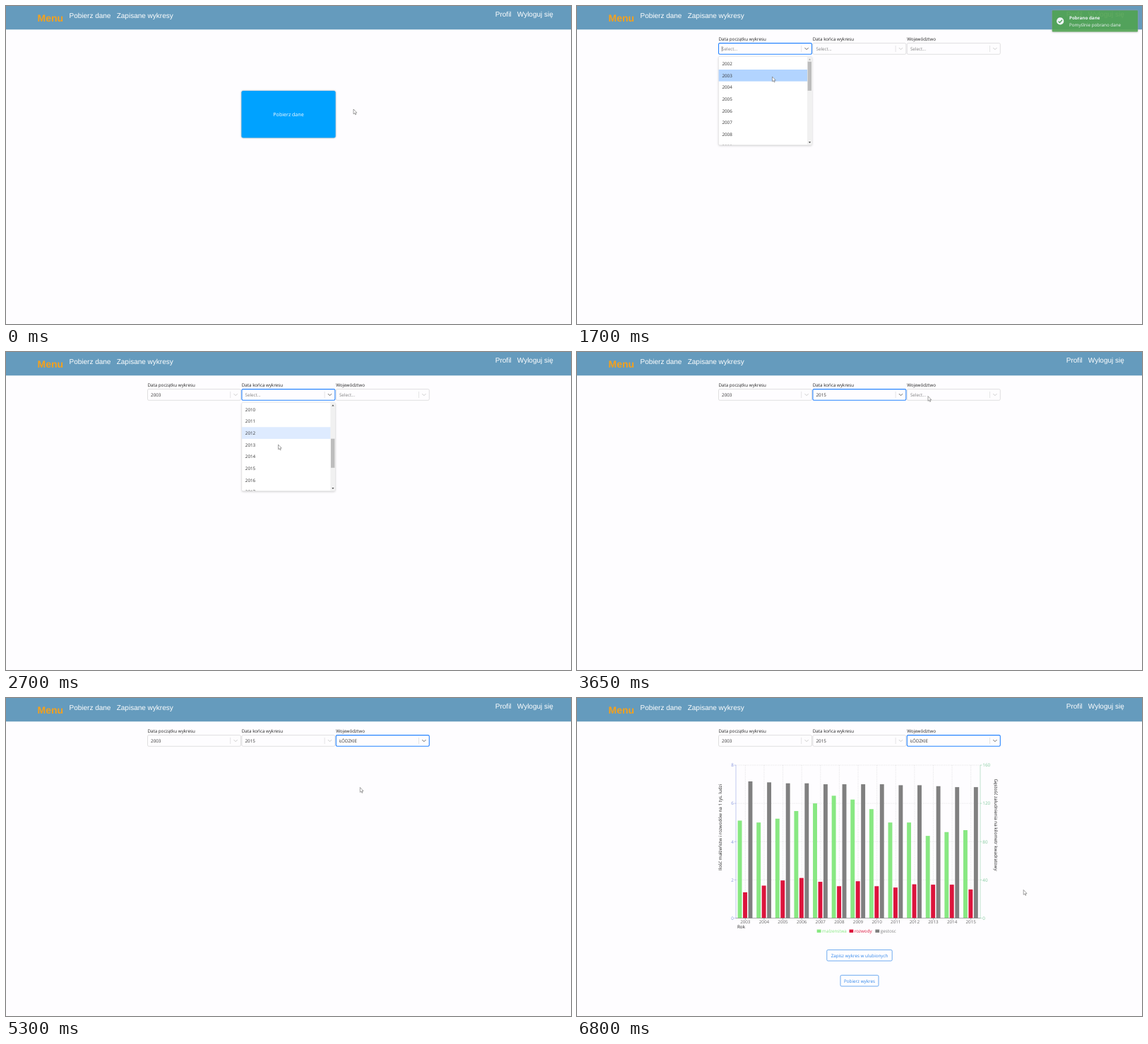
Animation, 800 px wide and 450 px high, one loop 7.35 s. Source, as an HTML page:

```html
<!DOCTYPE html>
<html lang="pl">
<head>
<meta charset="utf-8">
<title>Wykresy</title>
<style>
  html, body { margin: 0; width: 100%; height: 100%; overflow: hidden; background: #fefdff; }
  svg { display: block; }
  text { font: 6.27px "Open Sans", "Noto Sans", sans-serif; text-rendering: geometricPrecision; white-space: pre; }
  .nav { font: 10px "Liberation Sans", Arial, sans-serif; fill: #fff; }
  .brand { font: bold 14px "Liberation Sans", Arial, sans-serif; fill: #f5a11c; }
  .big { font-size: 7.08px; }
  .bold { font-weight: 700; }
</style>
</head>
<body>
<svg id="stage" width="800" height="450" viewBox="0 0 800 450"></svg>
<script>
const LOOP = 7350, STEP = 50;
const stage = document.getElementById('stage');

// ---------- helpers ----------
function el(parent, tag, attrs = {}, content) {
  const node = document.createElementNS('http://www.w3.org/2000/svg', tag);
  set(node, attrs);
  if (content !== undefined) node.textContent = content;
  parent.append(node);
  return node;
}
function set(node, attrs) {
  for (const key in attrs) node.setAttribute(key, attrs[key]);
}
const show = (node, on) => { node.style.display = on ? '' : 'none'; };
const group = (parent, attrs) => el(parent, 'g', attrs);
const rect = (p, x, y, width, height, fill, more) => el(p, 'rect', { x, y, width, height, fill, ...more });
const path = (p, d, stroke, width = 0.5, more) =>
  el(p, 'path', { d, stroke, fill: 'none', 'stroke-width': width, ...more });
const label = (p, str, x, y, fill = '#333', more) => el(p, 'text', { x, y, fill, ...more }, str);
const shadow = (dx, dy, blur, color) => ({ style: `filter:drop-shadow(${dx}px ${dy}px ${blur}px ${color})` });

const clamp = v => Math.min(1, Math.max(0, v));
const smooth = u => u * u * (3 - 2 * u);
const progress = (t, start, span) => clamp((t - start) / span);

// CSS "ease": cubic-bezier(.25, .1, .25, 1)
function ease(x) {
  let lo = 0, hi = 1;
  for (let i = 0; i < 24; i++) {
    const s = (lo + hi) / 2, r = 1 - s;
    if (0.75 * r * r * s + 0.75 * r * s * s + s ** 3 < x) lo = s; else hi = s;
  }
  const s = lo, r = 1 - s;
  return 0.3 * r * r * s + 3 * r * s * s + s ** 3;
}

// Last value of a [time, value] table
function stepAt(table, t) {
  let value = table[0][1];
  for (const [at, v] of table) if (t >= at) value = v;
  return value;
}

// ---------- timeline ----------
const FORM_AT = 900, CHART_AT = 5340, BARS_AT = 5366, TIP_AT = 5500;

// [start, end, x, y]: where each pointer move leads
const moves = [
  [0, 0, 492, 146], [300, 700, 432, 156], [900, 1350, 288, 62], [1430, 1640, 276.5, 100],
  [1800, 2110, 400, 61], [2180, 2290, 385.5, 131], [3250, 3640, 497, 62.5],
  [3850, 4010, 501.5, 133.5], [4840, 4900, 501.3, 126.5], [5690, 6200, 632.2, 271.5]
];
function pointerAt(t) {
  let [, , x, y] = moves[0];
  for (const [from, to, nx, ny] of moves.slice(1)) {
    if (t < from) break;
    const u = smooth(progress(t, from, to - from));
    x += (nx - x) * u;
    y += (ny - y) * u;
  }
  return { x, y };
}

const years = Array.from({ length: 20 }, (_, i) => String(2002 + i));
const regions = ['MAŁOPOLSKIE', 'ŚLĄSKIE', 'LUBUSKIE', 'WIELKOPOLSKIE', 'ZACHODNIOPOMORSKIE',
  'DOLNOŚLĄSKIE', 'OPOLSKIE', 'KUJAWSKO-POMORSKIE', 'POMORSKIE', 'WARMIŃSKO-MAZURSKIE', 'ŁÓDZKIE',
  'ŚWIĘTOKRZYSKIE', 'LUBELSKIE', 'PODKARPACKIE', 'PODLASKIE', 'MAZOWIECKIE'];

const fields = [
  { title: 'Data początku wykresu', options: years, pick: 1, open: 1400, press: 1660, close: 1760, blur: 2150,
    wheel: [], hover: [[0, 0], [1600, 1]] },
  { title: 'Data końca wykresu', options: years, pick: 13, open: 2150, press: 3150, close: 3220, blur: 3800,
    wheel: [2300, 2380, 2460, 2650], hover: [[0, 0], [2250, 2], [2280, 3], [2635, 10], [2880, 13]] },
  { title: 'Województwo', options: regions, pick: 10, open: 3800, press: 4950, close: 5010, blur: LOOP,
    wheel: [4050, 4130, 4210], hover: [[0, 0], [3930, 1], [3960, 2], [3990, 3], [4390, 11], [4870, 10]] }
];

const toasts = [
  { title: 'Pobrano dane', text: 'Pomyślnie pobrano dane', enter: 900, leave: 2000 },
  { title: 'Stworzono wykres', text: 'Pomyślnie stworzono wykres', enter: 5318, leave: 6410 }
];

// ---------- page ----------
rect(stage, 0, 0, 800, 450, '#fefdff');
rect(stage, 0, 0, 800, 33.3, '#659bbd');
label(stage, 'Menu', 44.5, 21.6, '', { class: 'brand' });
[['Pobierz dane', 89.5, 17], ['Zapisane wykresy', 156.7, 17], ['Profil', 692.8, 15], ['Wyloguj się', 723.8, 15]]
  .forEach(([str, x, y]) => label(stage, str, x, y, '#fff', { class: 'nav' }));

const start = group(stage);
rect(start, 333.4, 120, 133.2, 66.6, '#00a2ff', { rx: 2.5, ...shadow(0.5, 0.6, 0.8, 'rgba(0,0,0,.4)') });
label(start, 'Pobierz dane', 400, 156.4, '#fff', { class: 'big', 'text-anchor': 'middle' });

const form = group(stage);

// ---------- chart ----------
const LEFT = 225, RIGHT = 571, TOP = 95, BASE = 311.5, BAND = (RIGHT - LEFT) / 13;
const GREEN = '#88e882', RED = '#dc143c', GREY = '#808080';
const series = [
  { name: 'malzenstwa', color: GREEN, max: 8, legend: 339.7,
    data: [5.1, 5, 5.2, 5.6, 6, 6.4, 6.2, 5.7, 5, 5, 4.3, 4.5, 4.6] },
  { name: 'rozwody', color: RED, max: 8, legend: 385.5,
    data: [1.35, 1.7, 1.97, 2.1, 1.9, 1.67, 1.93, 1.67, 1.6, 1.77, 1.75, 1.75, 1.5] },
  { name: 'gestosc', color: GREY, max: 160, legend: 422.4,
    data: [143, 142, 141, 141, 140, 140, 140, 140, 139, 139, 138, 137, 137] }
];
const chart = group(form);
const centre = i => LEFT + BAND * (i + 0.5);
const dash = { 'stroke-dasharray': '1.25 1.25' };

for (let i = 0; i < 5; i++) {
  const y = TOP + (BASE - TOP) * i / 4;
  path(chart, `M${LEFT} ${y}H${RIGHT}`, '#ccc', 0.45, dash);
  path(chart, `M${LEFT - 2.5} ${y}H${LEFT}`, '#8494dc');
  path(chart, `M${RIGHT} ${y}h2.5`, '#82ca9d');
  label(chart, 8 - 2 * i, 221.8, y + 2.3, '#8494dc', { 'text-anchor': 'end' });
  label(chart, 160 - 40 * i, 574.3, y + 2.3, '#82ca9d');
}
for (let i = 0; i < 13; i++) {
  path(chart, `M${centre(i)} ${TOP}V${BASE}`, '#ccc', 0.45, dash);
  path(chart, `M${centre(i)} ${BASE}v2.5`, '#666');
  label(chart, 2003 + i, centre(i), 319.4, '#666', { 'text-anchor': 'middle' });
}
const band = rect(chart, 0, TOP, BAND, BASE - TOP, '#ccc');
const bars = series.flatMap((s, k) => s.data.map((v, i) => ({
  node: rect(chart, LEFT + BAND * i + 2.6 + 7.45 * k, 0, 5.9, 0, s.color),
  full: v / s.max * (BASE - TOP)
})));
path(chart, `M${LEFT} ${TOP}V${BASE}`, '#8494dc');
path(chart, `M${RIGHT} ${TOP}V${BASE}`, '#82ca9d');
path(chart, `M${LEFT} ${BASE}H${RIGHT}`, '#666');
label(chart, 'Rok', 227, 326.2, '#222');
const turned = (str, x, y, angle) =>
  label(chart, str, 0, 0, '#222', { 'text-anchor': 'middle', transform: `translate(${x} ${y}) rotate(${angle})` });
turned('Ilość małżeństw i rozwodów na 1 tys. ludzi', 205, 183, -90);
turned('Gęstość zaludnienia na kilometr kwadratowy', 591, 179.5, 90);
for (const s of series) {
  rect(chart, s.legend, 327.6, 5.8, 4.4, s.color);
  label(chart, s.name, s.legend + 7.4, 331.8, s.color);
}
for (const [str, y, w] of [['Zapisz wykres w ulubionych', 356.4, 92.4], ['Pobierz wykres', 392.3, 54]]) {
  rect(chart, 400 - w / 2, y, w, 15.6, 'none', { rx: 1.7, stroke: '#2f86ea', 'stroke-width': 0.7 });
  label(chart, str, 400, y + 10.2, '#2f86ea', { 'text-anchor': 'middle' });
}

const tip = group(chart);
rect(tip, 0, 0, 56.5, 58.7, '#fff', { stroke: '#ccc', 'stroke-width': 0.5 });
const tipYear = label(tip, '', 3.9, 11.5);
const tipRows = series.map((s, k) => label(tip, '', 3.9, 23.5 + 13.2 * k, s.color));

function drawChart(t, pointer) {
  show(chart, t >= CHART_AT);
  const grow = ease(progress(t, BARS_AT, 400));
  for (const { node, full } of bars) set(node, { y: BASE - full * grow, height: full * grow });

  const i = Math.floor((pointer.x - LEFT) / BAND);
  const over = t >= TIP_AT && i < 13;
  show(band, over);
  show(tip, over);
  if (!over) return;
  set(band, { x: LEFT + BAND * i });
  const x = 504.6 - 18 * smooth(progress(t, 5800, 120));
  set(tip, { transform: `translate(${x} ${pointer.y + 4.3})` });
  tipYear.textContent = 2003 + i;
  series.forEach((s, k) => { tipRows[k].textContent = `${s.name} : ${s.data[i]}`; });
}

// ---------- selects ----------
const ROW = 16.667, VIEW = 125, NOTCH = 41.667, TRACK = 110.8;

fields.forEach((f, n) => {
  const x = 200.4 + 133.4 * n;
  const g = group(form);
  label(g, f.title, x, 49.2, '#222');
  f.box = rect(g, x + 0.1, 52.6, 132, 15.7, '#fefdff', { rx: 1.7 });
  f.value = label(g, '', x + 4.7, 62.8);
  f.caret = path(g, `M${x + 4.9} 57v7.4`, '#333');
  path(g, `M${x + 117.3} 56v9`, '#ccc');
  f.arrow = path(g, `M${x + 122.4} 59.4l2.3 2.3l2.3 -2.3`, '', 1, { 'stroke-linecap': 'round' });

  f.menu = group(form);
  rect(f.menu, x, 71.4, 132.4, VIEW + 0.4, '#fff',
    { rx: 1.7, stroke: 'rgba(0,0,0,.12)', 'stroke-width': 0.5, ...shadow(0, 1.2, 1.6, 'rgba(0,0,0,.18)') });
  const view = el(f.menu, 'svg', { x, y: 71.6, width: 132.4, height: VIEW });
  f.list = group(view);
  f.mark = rect(f.list, 0, 0, 126, ROW, '');
  f.options.forEach((str, i) => label(f.list, str, 5, 12.5 + ROW * i));
  rect(view, 125.6, 0, 6.8, VIEW, '#f1f1f1');
  f.up = el(view, 'path', { d: 'M127.5 5l1.6 -2l1.6 2z' });
  el(view, 'path', { d: 'M127.5 120.4l1.6 2l1.6 -2z', fill: '#444' });
  f.thumb = rect(view, 126.2, 0, 5.4, 0, '#bdbdbd');
});

function drawField(f, t) {
  const focused = t >= f.open && t < f.blur;
  const opened = t >= f.open && t < f.close;
  const chosen = t >= f.close;
  set(f.box, { stroke: focused ? '#2684ff' : '#ccc', 'stroke-width': focused ? 1.1 : 0.6 });
  set(f.arrow, { stroke: focused ? '#666' : '#ccc' });
  set(f.value, { fill: chosen ? '#333' : '#808080' });
  f.value.textContent = chosen ? f.options[f.pick] : 'Select...';
  show(f.caret, opened && (t - f.open) % 1000 < 500);
  show(f.menu, opened);
  if (!opened) return;

  const total = f.options.length * ROW + 3.33;
  const scroll = f.wheel.reduce((sum, at) => sum + NOTCH * smooth(progress(t, at, 170)), 0);
  set(f.list, { transform: `translate(0 ${-scroll})` });
  set(f.mark, { y: 1.67 + ROW * stepAt(f.hover, t), fill: t >= f.press ? '#b2d4ff' : '#deebff' });
  set(f.thumb, { y: 7.1 + TRACK * scroll / total, height: TRACK * VIEW / total });
  set(f.up, { fill: scroll > 0 ? '#444' : '#a3a3a3' });
}

// ---------- toasts and pointer ----------
for (const n of toasts) {
  n.node = group(stage);
  rect(n.node, 672.8, 6.2, 121.2, 30.4, '#51a351', { rx: 0.8, ...shadow(0, 0, 1.8, '#999') });
  el(n.node, 'circle', { cx: 684.2, cy: 21.4, r: 5.1, fill: '#fff' });
  path(n.node, 'M681.6 21.6l1.9 1.9l3.5 -3.7', '#51a351', 1.3);
  label(n.node, n.title, 697, 19.2, '#fff', { class: 'bold' });
  label(n.node, n.text, 697, 29.2, '#fff');
}
function drawToast(n, t) {
  show(n.node, t >= n.enter && t < n.leave + 400);
  set(n.node, {
    transform: `translate(${121 * (1 - ease(progress(t, n.enter, 400)))} 0)`,
    opacity: 0.9 * (1 - ease(progress(t, n.leave, 400)))
  });
}

const arrow = el(stage, 'path', {
  d: 'M0 0V6.9L1.6 5.5L2.7 7.9L3.7 7.4L2.7 5.1H4.8Z', fill: '#fff', stroke: '#666', 'stroke-width': 0.6
});

function draw(t) {
  const pointer = pointerAt(t);
  show(start, t < FORM_AT);
  show(form, t >= FORM_AT);
  fields.forEach(f => drawField(f, t));
  drawChart(t, pointer);
  toasts.forEach(n => drawToast(n, t));
  set(arrow, { transform: `translate(${pointer.x} ${pointer.y})` });
}

const began = performance.now();
function tick() {
  const t = (performance.now() - began) % LOOP;
  draw(Math.floor(t / STEP) * STEP);
  requestAnimationFrame(tick);
}
tick();
</script>
</body>
</html>
```
